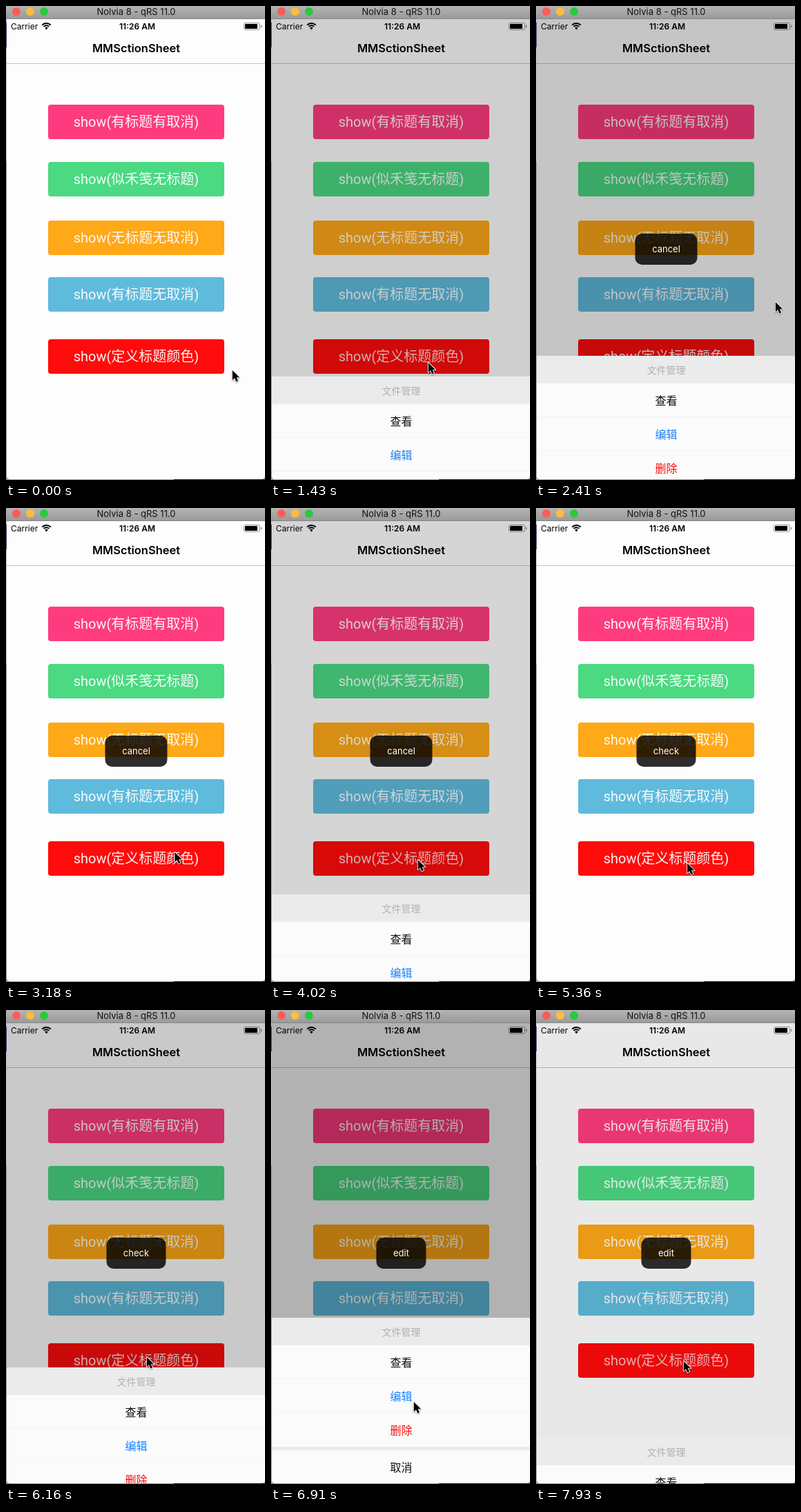
An HTML page with a canvas that plays this animation: 375x687 px, repeating every 8 s.

```html
<!DOCTYPE html>
<html lang="zh">
<head>
<meta charset="utf-8">
<style>
html, body { margin: 0; width: 100%; height: 100%; overflow: hidden; background: #fdfdfd; }
canvas { display: block; }
</style>
</head>
<body>
<canvas id="stage" width="375" height="687"></canvas>
<script>
const ctx = document.getElementById('stage').getContext('2d');
const LOOP = 8000, SLIDE = 250, SHEET_HEIGHT = 241, BOTTOM = 686, CENTER = 188.5;
const UI = 'Inter, "Noto Sans CJK SC", "Noto Sans CJK", sans-serif';
const BUTTON_FONT = '20px Roboto, "Noto Sans CJK SC", "Noto Sans CJK", sans-serif';

const buttons = [
  [143, '#ff3b7f', 'show(有标题有取消)'],
  [226, '#4bd982', 'show(似禾笺无标题)'],
  [311, '#ffa818', 'show(无标题无取消)'],
  [393, '#5fbbdc', 'show(有标题无取消)'],
  [483, '#ff0b0b', 'show(定义标题颜色)']
];
const rows = [
  [40, '查看', '#111'],
  [89, '编辑', '#1882fb'],
  [138, '删除', '#ff0a0a'],
  [192, '取消', '#111']
];
const sheets = [
  { open: 1286, close: 2328, toast: 'cancel' },
  { open: 3892, close: 4913, toast: 'check' },
  { open: 6002, close: 6900, toast: 'edit' },
  { open: 7845, close: Infinity }
];
// time, x, y of the pointer tip
const pointerPath = [
  [290, 327, 528], [960, 227, 517], [1560, 227, 517], [1990, 345, 437], [2180, 346, 429],
  [2560, 346, 429], [3120, 256, 500], [3190, 243, 499], [3420, 243, 499], [3760, 212, 510],
  [4230, 212, 510], [4720, 222, 518], [5180, 222, 518], [5820, 203, 503], [6260, 203, 503],
  [6700, 206, 568], [7080, 206, 568], [7620, 213, 509], [8000, 213, 509]
];

const clamp = v => Math.max(0, Math.min(1, v));
const ease = v => { v = clamp(v); return v * v * (3 - 2 * v); };

function rect(x, y, w, h, fill, radius = 0) {
  ctx.fillStyle = fill;
  ctx.beginPath();
  ctx.roundRect(x, y, w, h, radius);
  ctx.fill();
}

function text(str, x, y, font, fill, align = 'center') {
  ctx.font = font;
  ctx.fillStyle = fill;
  ctx.textAlign = align;
  ctx.fillText(str, x, y);
}

function drawWindow() {
  rect(0, 0, 375, 687, '#a2a2a2');
  rect(0, 19, 1, 206, '#b9b9bd');
  rect(0, 24, 1, 36, '#39346e');
  rect(0, 225, 1, 462, '#8d8d8d');
  rect(0, 686, 243, 1, '#8d8d8d');
  rect(243, 686, 132, 1, '#000');
  const bar = ctx.createLinearGradient(0, 0, 0, 18);
  bar.addColorStop(0, '#b4b4b4');
  bar.addColorStop(1, '#9a9a9a');
  rect(0, 0, 375, 18, bar);
  rect(0, 18, 375, 1, '#858585');
  ['#fc5c56', '#fdbc40', '#29c940'].forEach((color, i) => rect(9 + 20 * i, 2, 12, 12, color, 6));
  text('Nolvia 8 - qRS 11.0', CENTER, 13, '13px ' + UI, '#111');
}

function drawStatusBar() {
  text('Carrier', 7, 34, '12px ' + UI, '#000', 'left');
  text('11:26 AM', 190, 34, '600 12px ' + UI, '#000');
  ctx.strokeStyle = '#000';
  ctx.lineWidth = 2;
  for (const radius of [5.3, 8.6]) {
    ctx.beginPath();
    ctx.arc(58.5, 33.5, radius, -Math.PI * .76, -Math.PI * .24);
    ctx.stroke();
  }
  ctx.fillStyle = '#000';
  ctx.beginPath();
  ctx.moveTo(58.5, 34.5);
  ctx.arc(58.5, 33.5, 2.8, -Math.PI * .78, -Math.PI * .22);
  ctx.fill();
  ctx.lineWidth = 1;
  ctx.strokeStyle = '#999';
  ctx.beginPath();
  ctx.roundRect(344.5, 24.5, 23, 10, 2.5);
  ctx.stroke();
  rect(346, 26, 18, 7, '#000', 1);
  rect(369, 27.5, 1.5, 4, '#999', 1);
}

function drawPage(t) {
  rect(1, 19, 374, 667, '#fdfdfd');
  drawStatusBar();
  text('MMSctionSheet', CENTER, 67, '600 16.5px ' + UI, '#000');
  rect(1, 83, 374, 1, '#c2c2c2');
  buttons.forEach(([y, color, label], i) => {
    rect(61, y, 255, 50, color, 4);
    const alpha = i === 4 ? .95 - .3 * pressed(t) : .95;
    text(label, CENTER, y + 32, BUTTON_FONT, `rgba(255,255,255,${alpha})`);
  });
}

function pressed(t) {
  return Math.max(...sheets.map(({ open }) =>
    t < open - 150 ? 0 : 1 - ease((t - open) / SLIDE)));
}

function openness(t) {
  return Math.max(...sheets.map(({ open, close }) =>
    ease((t - open) / SLIDE) - ease((t - close) / SLIDE)));
}

function drawSheet(amount) {
  if (amount <= 0) return;
  rect(1, 19, 374, 667, `rgba(0,0,0,${.3 * amount})`);
  const top = Math.round(BOTTOM - SHEET_HEIGHT * amount);
  rect(1, top, 374, SHEET_HEIGHT, '#ebebeb');
  text('文件管理', CENTER, top + 25.5, '14px ' + UI, '#b0b0b0');
  for (const [offset, label, color] of rows) {
    rect(1, top + offset, 374, offset < 138 ? 48.5 : 49, '#fbfbfb');
    text(label, CENTER, top + offset + 30.5, '16px ' + UI, color);
  }
}

function drawToast(t) {
  const shown = sheets.filter(s => t >= s.close).pop();
  if (!shown) return;
  ctx.globalAlpha = 1 - ease((t - shown.close - 2000) / 300);
  ctx.font = '13px ' + UI;
  const width = Math.round(ctx.measureText(shown.toast).width) + 49;
  rect(CENTER - width / 2, 330, width, 45, 'rgba(0,0,0,.82)', 10);
  text(shown.toast, CENTER, 357, ctx.font, '#fff');
  ctx.globalAlpha = 1;
}

function pointerAt(t) {
  const next = pointerPath.findIndex(p => p[0] > t);
  if (next < 1) return pointerPath[0].slice(1);
  const [t0, x0, y0] = pointerPath[next - 1], [t1, x1, y1] = pointerPath[next];
  const k = ease((t - t0) / (t1 - t0));
  return [x0 + (x1 - x0) * k, y0 + (y1 - y0) * k];
}

const arrow = new Path2D('M.8 0V14.2L4 11.2L6.3 16.4L9 15.2L6.8 10.2H11.2Z');

function drawPointer(t) {
  ctx.save();
  ctx.translate(...pointerAt(t));
  ctx.lineWidth = 1.8;
  ctx.lineJoin = 'round';
  ctx.strokeStyle = '#fff';
  ctx.shadowColor = 'rgba(0,0,0,.4)';
  ctx.shadowBlur = 2;
  ctx.shadowOffsetY = 1;
  ctx.stroke(arrow);
  ctx.shadowColor = 'transparent';
  ctx.fillStyle = '#000';
  ctx.fill(arrow);
  ctx.restore();
}

function draw(now) {
  const t = now % LOOP;
  drawWindow();
  ctx.save();
  ctx.beginPath();
  ctx.roundRect(1, 19, 374, 667, [0, 0, 5, 5]);
  ctx.clip();
  drawPage(t);
  drawSheet(openness(t));
  drawToast(t);
  ctx.restore();
  drawPointer(t);
  requestAnimationFrame(() => draw(performance.now() - start));
}

const start = performance.now();
draw(0);
</script>
</body>
</html>
```
